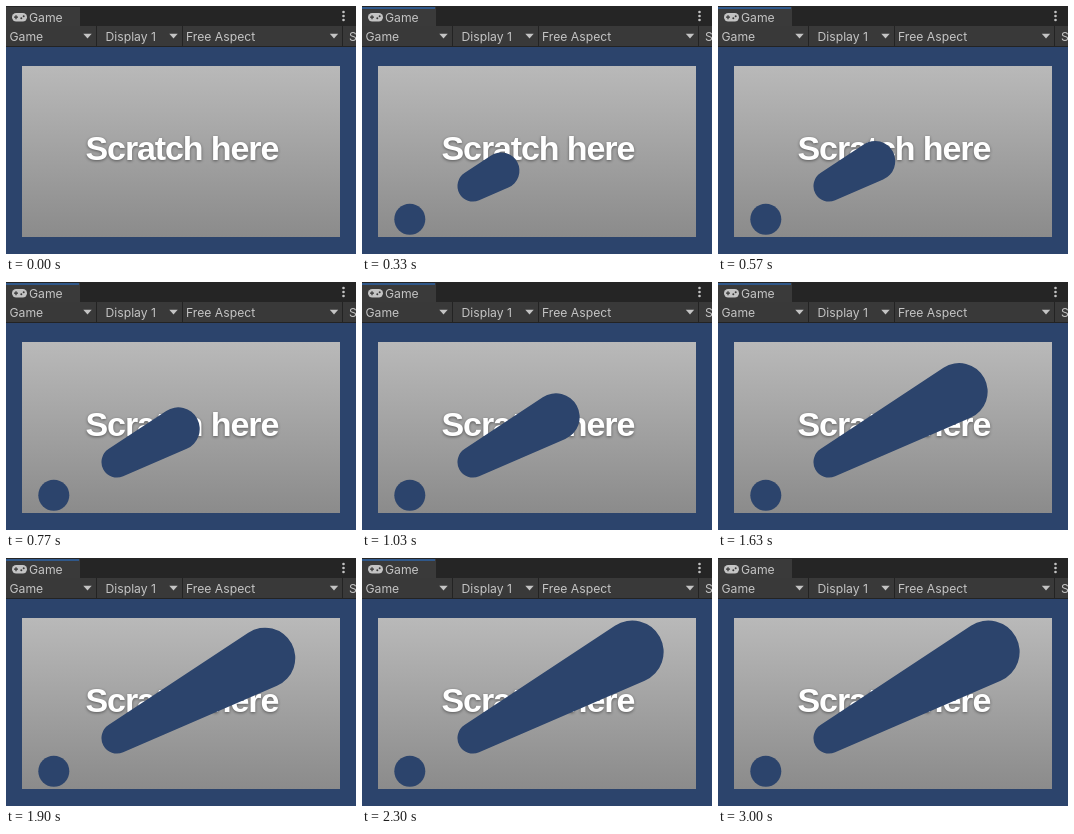
An HTML page for the animation above (3070 ms loop, 350 by 248 pixels).

```html
<!DOCTYPE html>
<html lang="en">
<head>
<meta charset="utf-8">
<title>Scratch card</title>
<style>
  html, body { margin: 0; width: 100%; height: 100%; overflow: hidden; background: #2c446c; }
  svg { display: block; width: 350px; height: 248px; }
  .label { font: 12.2px Inter, sans-serif; fill: #c4c4c4; }
  .title {
    font: bold 34px "Liberation Sans", Arial, sans-serif;
    letter-spacing: -1.1px;
    fill: #fff;
    filter: drop-shadow(0 1.5px 1.5px rgba(0, 0, 0, .45));
  }
  .scratch { fill: #2c446c; }
</style>
</head>
<body>
<svg viewBox="0 0 350 248">
  <defs>
    <linearGradient id="foil" x1="0" y1="0" x2="0" y2="1">
      <stop offset="0" stop-color="#b9b9b9"/>
      <stop offset="1" stop-color="#8b8b8b"/>
    </linearGradient>
    <path id="arrow" d="M-4.2 -2.3H4.2L0 2.6Z" fill="#c4c4c4"/>
  </defs>

  <rect width="350" height="248" fill="#2c446c"/>

  <!-- Tab strip -->
  <rect width="350" height="20" fill="#252525"/>
  <rect y="1" width="74" height="20" fill="#3a3a3a"/>
  <rect id="focus" y="1" width="73" height="2" fill="#30588a"/>
  <g fill="#c4c4c4">
    <rect x="6" y="7" width="15" height="8.5" rx="4.2"/>
    <circle cx="337.5" cy="6" r="1.3"/>
    <circle cx="337.5" cy="10" r="1.3"/>
    <circle cx="337.5" cy="14" r="1.3"/>
  </g>
  <path d="M8 11.2h4M10 9.2v4" stroke="#3a3a3a" stroke-width="1.3"/>
  <circle cx="15.3" cy="12.3" r="1" fill="#3a3a3a"/>
  <circle cx="17.7" cy="10.2" r="1" fill="#3a3a3a"/>
  <text class="label" x="23" y="15.5">Game</text>

  <!-- Toolbar -->
  <rect y="20" width="350" height="21" fill="#393939"/>
  <path d="M90.5 20V40M176.5 20V40M336.5 20V40M0 40.5H350" stroke="#232323"/>
  <g class="label">
    <text x="3.5" y="34.5">Game</text>
    <text x="99.5" y="34.5">Display 1</text>
    <text x="180" y="34.5">Free Aspect</text>
    <text x="343" y="34.5">S</text>
  </g>
  <use href="#arrow" x="81.5" y="30"/>
  <use href="#arrow" x="167.5" y="30"/>
  <use href="#arrow" x="328" y="30"/>

  <!-- Card -->
  <rect x="16" y="60" width="318" height="171" fill="url(#foil)"/>
  <text class="title" x="79.5" y="153.5">Scratch here</text>
  <circle id="dot" class="scratch" cx="47.8" cy="213.3" r="15.5"/>
  <path id="stroke" class="scratch"/>
</svg>
<script>
  const LOOP = 3070, FRAME = 100 / 3;
  const START = { x: 111, y: 180, r: 15.5 };
  const ANGLE = Math.atan2(-86, 159);
  const TAPER = 0.088;
  const TANGENT = Math.acos(-TAPER);
  // [time in ms, distance travelled by the brush]
  const TRAVEL = [[70, 0], [330, 32], [770, 69.5], [1070, 98], [1270, 115], [1630, 148], [2070, 181]];

  const [focusLine, dot, stroke] = ["focus", "dot", "stroke"].map(id => document.getElementById(id));

  function distanceAt(t) {
    const next = TRAVEL.findIndex(([time]) => time > t);
    if (next < 0) return TRAVEL[TRAVEL.length - 1][1];
    const [t0, d0] = TRAVEL[next - 1], [t1, d1] = TRAVEL[next];
    return d0 + (d1 - d0) * (t - t0) / (t1 - t0);
  }

  function rim({ x, y, r }, angle) {
    return `${(x + r * Math.cos(angle)).toFixed(2)} ${(y + r * Math.sin(angle)).toFixed(2)}`;
  }

  // Outline around the first and last brush circles and their shared tangents.
  function taperedPath(distance) {
    const tip = {
      x: START.x + distance * Math.cos(ANGLE),
      y: START.y + distance * Math.sin(ANGLE),
      r: START.r + distance * TAPER
    };
    const a = ANGLE + TANGENT, b = ANGLE - TANGENT;
    return `M${rim(START, a)}A${START.r} ${START.r} 0 0 1 ${rim(START, b)}` +
           `L${rim(tip, b)}A${tip.r} ${tip.r} 0 1 1 ${rim(tip, a)}Z`;
  }

  function show(element, visible) {
    element.style.visibility = visible ? "visible" : "hidden";
  }

  function draw(now) {
    const elapsed = now % LOOP;
    const t = Math.round(Math.floor((elapsed + 3.4) / FRAME) * FRAME / 10) * 10;
    show(focusLine, t >= 30 && t < 3000);
    show(dot, t >= 30);
    show(stroke, t >= 70);
    if (t >= 70) stroke.setAttribute("d", taperedPath(distanceAt(t)));
    requestAnimationFrame(draw);
  }

  draw(0);
</script>
</body>
</html>
```
